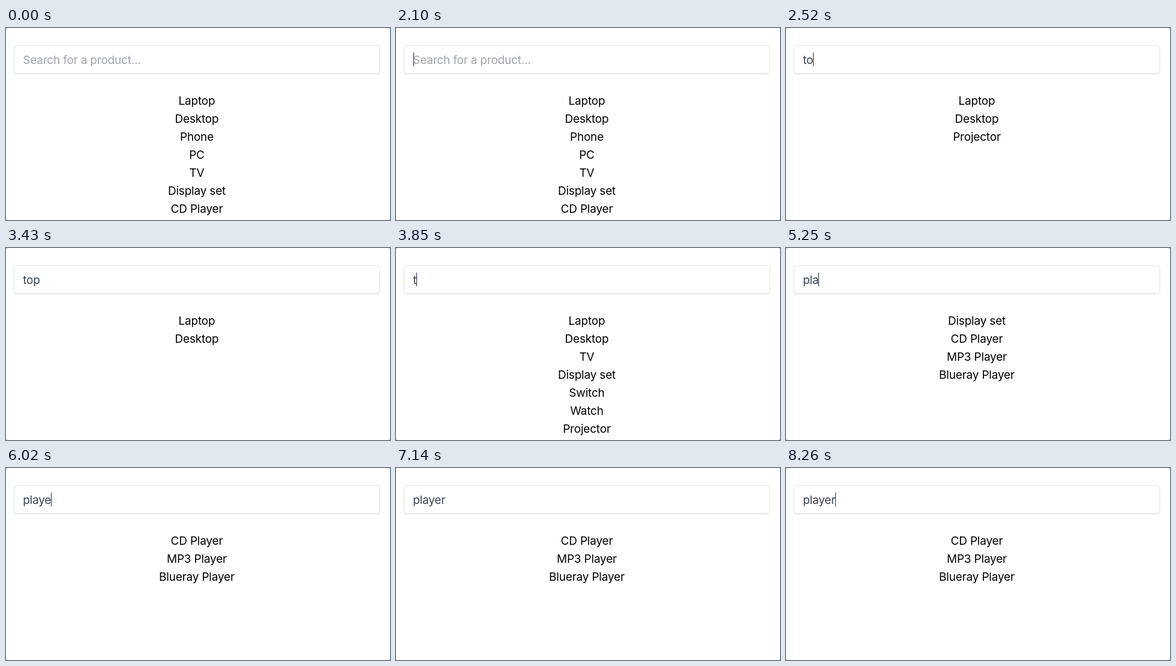
Recreate the animation shown at these times as an HTML page. Size 640 px wide and 320 px high, loop 8.4 s.

```html
<!DOCTYPE html>
<html lang="en">
<head>
<meta charset="utf-8">
<title>Product search</title>
<style>
  html, body { margin: 0; width: 100%; height: 100%; overflow: hidden; background: #8a8a8a; }
  svg { display: block; width: 100%; height: 100%; }
  text { font: 19px Inter, Roboto, sans-serif; letter-spacing: -0.2px; }
  .field { fill: #fff; stroke: #e5e7eb; filter: drop-shadow(0 1px 1px rgba(0, 0, 0, .12)); }
  .hint { fill: #9ca3af; }
  .query { fill: #374151; }
  .list { text-anchor: middle; }
</style>
</head>
<body>
<svg viewBox="0 0 640 320">
  <rect width="640" height="320" rx="2.5" fill="#fff"/>
  <rect class="field" x="13.5" y="29.5" width="609" height="46" rx="4"/>
  <text id="hint" class="hint" x="28.2" y="60">Search for a product...</text>
  <text id="query" class="query" x="28.2" y="60"></text>
  <rect id="caret" y="41" width="1" height="23" fill="#1f2937"/>
  <g id="list" class="list"></g>
</svg>
<script>
const LOOP = 8400, TICK = 70, FOCUS = 1050, BLINK = 530;
const ROWS = 7, ROW_HEIGHT = 30;

const products = [
  "Laptop", "Desktop", "Phone", "PC", "TV", "Display set", "CD Player",
  "MP3 Player", "Blueray Player", "Switch", "Watch", "Projector"
];

// Time of each keystroke and the text it leaves in the field
const keys = [
  [FOCUS, ""], [2240, "t"], [2520, "to"], [2800, "top"],
  [3640, "to"], [3850, "t"], [4060, ""],
  [4760, "p"], [5040, "pl"], [5250, "pla"], [5670, "play"],
  [6020, "playe"], [6160, "player"]
];

const [hint, query, caret, list] =
  ["hint", "query", "caret", "list"].map(id => document.getElementById(id));

const rows = Array.from({ length: ROWS }, (_, i) => {
  const row = document.createElementNS("http://www.w3.org/2000/svg", "text");
  row.setAttribute("x", 318);
  row.setAttribute("y", 128 + i * ROW_HEIGHT);
  list.append(row);
  return row;
});

const show = (el, on) => el.setAttribute("visibility", on ? "visible" : "hidden");

let shown = null;
function setQuery(text) {
  if (text === shown) return;
  shown = text;
  query.textContent = text;
  show(hint, !text);
  const hits = products.filter(name => name.toLowerCase().includes(text));
  rows.forEach((row, i) => row.textContent = hits[i] || "");
  const width = text ? query.getComputedTextLength() : 0;
  caret.setAttribute("x", text ? Math.round(28.1 + width) : 29);
}

function render(time) {
  const t = Math.floor((time % LOOP) / TICK) * TICK;
  const key = keys.filter(([at]) => at <= t).pop();
  setQuery(key ? key[1] : "");
  // Each keystroke restarts the blink
  show(caret, key && (t - key[0] + 40) % (2 * BLINK) < BLINK);
}

let start = null;
function frame(now) {
  if (start === null) start = now;
  render(now - start);
  requestAnimationFrame(frame);
}
render(0);
requestAnimationFrame(frame);
</script>
</body>
</html>
```
